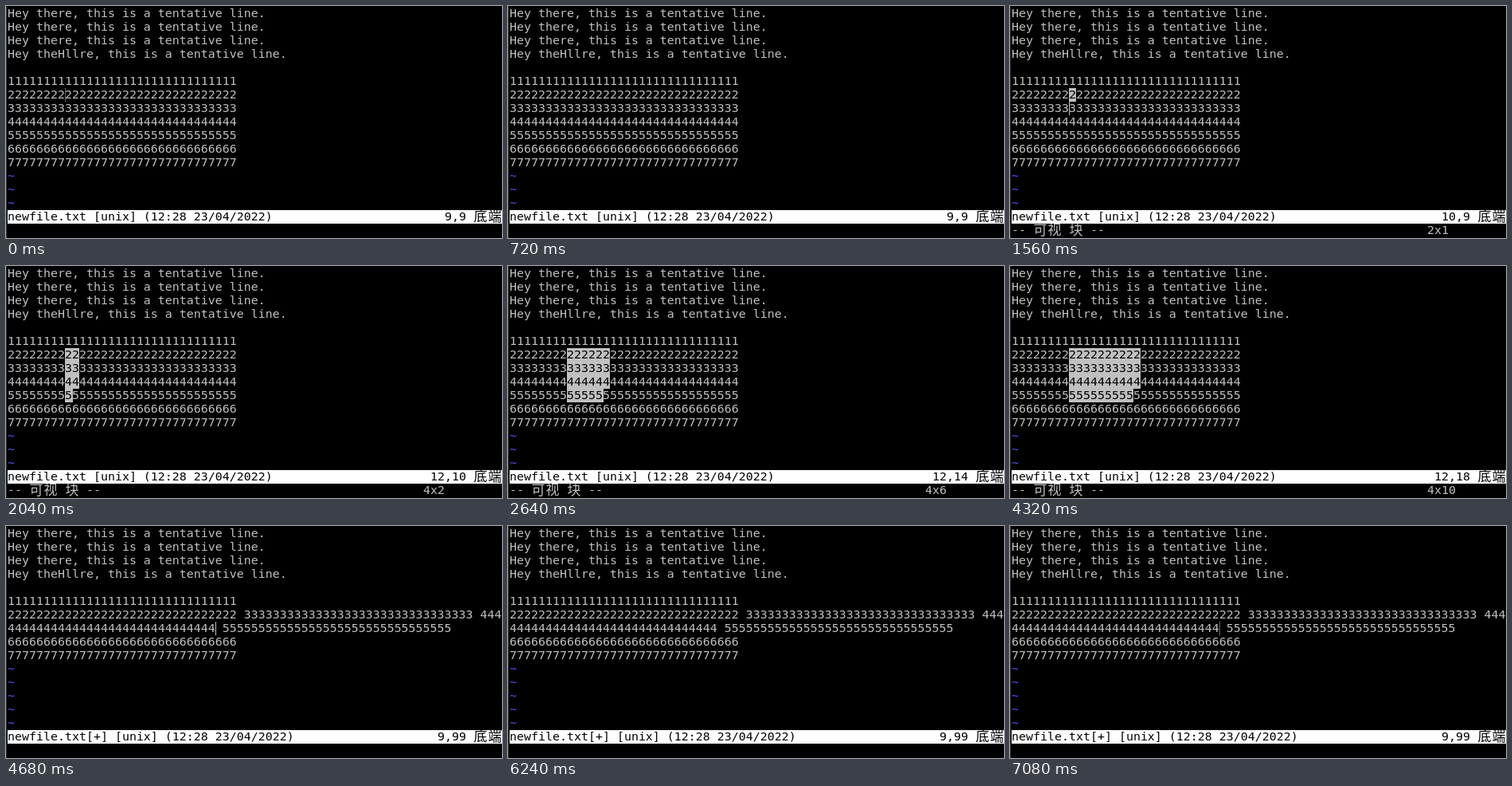
Recreate the animation shown at these times as an HTML page. Size 623x291 px, loop 7140 ms.

```html
<!DOCTYPE html>
<html lang="en">
<head>
<meta charset="utf-8">
<title>Joining lines from a block selection</title>
<style>
  html, body { margin: 0; width: 100%; height: 100%; overflow: hidden; background: #000; }
  svg { display: block; width: 623px; height: 291px; }
  text { font: 14.95px "DejaVu Sans Mono", "Liberation Mono", monospace; white-space: pre; }
  text.cjk { font: 17px "Noto Sans CJK SC", "Noto Sans CJK", sans-serif; }
</style>
</head>
<body>
<svg id="stage" viewBox="0 0 623 291"></svg>
<script>
const LOOP = 7140, CELL = 9, LINE = 17, LEFT = 2, TOP = 1;
const GRAY = '#c0c0c0', BLUE = '#5050f0';
const STATUS_ROW = 15, COMMAND_ROW = 16, ANCHOR = { row: 6, col: 8 };
const stage = document.getElementById('stage');

const digits = d => String(d).repeat(32);
const greeting = 'Hey there, this is a tentative line.';
const intro = [greeting, greeting, greeting, 'Hey theHllre, this is a tentative line.', ''];
const joined = [2, 3, 4, 5].map(digits).join(' ');
const fill = lines => [...lines, ...Array(STATUS_ROW - lines.length).fill('~')];
const before = fill([...intro, ...[1, 2, 3, 4, 5, 6, 7].map(digits)]);
const after = fill([...intro, digits(1), joined.slice(0, 69), joined.slice(69), digits(6), digits(7)]);

// Block selection corner: [start time, row, column]
const moves = [
  [1200, 6, 8], [1560, 7, 8], [1680, 8, 8], [1920, 9, 8], [2040, 9, 9],
  [2580, 9, 11], [2640, 9, 13], [2700, 9, 14], [2760, 9, 16], [2820, 9, 17]
];
const blinks = [720, 1200, 3300, 3840, 4320, 4680, 5220, 5700, 6240, 6720];

const px = col => LEFT + col * CELL;
const py = row => TOP + row * LINE;

function add(tag, attrs, content = '') {
  const node = document.createElementNS('http://www.w3.org/2000/svg', tag);
  for (const key in attrs) node.setAttribute(key, attrs[key]);
  node.textContent = content;
  stage.append(node);
}

const box = (x, y, width, height, fill) =>
  add('rect', { x, y, width, height, fill, 'shape-rendering': 'crispEdges' });

const print = (row, col, str, fill = GRAY) =>
  add('text', { x: px(col), y: py(row) + 13, fill }, str);

// Wide characters take two cells each.
function printWide(row, col, str, fill = GRAY) {
  [...str].forEach((ch, i) =>
    add('text', { class: 'cjk', x: px(col + i * 2) + 0.5, y: py(row) + 14, fill }, ch));
}

function drawSelection(lines, end) {
  for (let row = ANCHOR.row; row <= end.row; row++) {
    // The bar cursor leaves its own cell unlit.
    const stop = row === end.row ? end.col : end.col + 1;
    const width = stop - ANCHOR.col;
    if (width < 1) continue;
    box(px(ANCHOR.col), py(row), width * CELL, LINE, GRAY);
    print(row, ANCHOR.col, lines[row].slice(ANCHOR.col, stop), '#000');
  }
}

function drawCursor({ row, col }, focused, lit) {
  const x = px(col), y = py(row);
  if (!focused) {
    for (let i = 0; i < LINE; i += 2) box(x, y + i, 1, 1, GRAY);
  } else if (lit) {
    box(x, y, 1, LINE, GRAY);
  }
}

function drawStatus(isJoined, row, col) {
  box(LEFT, py(STATUS_ROW), 621, LINE, '#fff');
  print(STATUS_ROW, 0, `newfile.txt${isJoined ? '[+]' : ''} [unix] (12:28 23/04/2022)`, '#000');
  const ruler = `${row},${col}`;
  print(STATUS_ROW, 64 - ruler.length, ruler, '#000');
  printWide(STATUS_ROW, 65, '底端', '#000');
}

function drawMode(end) {
  print(COMMAND_ROW, 0, '--');
  printWide(COMMAND_ROW, 3, '可视');
  printWide(COMMAND_ROW, 8, '块');
  print(COMMAND_ROW, 11, '--');
  print(COMMAND_ROW, 58, `${end.row - ANCHOR.row + 1}x${end.col - ANCHOR.col + 1}`);
}

function stateAt(t) {
  const isJoined = t >= 4680;
  const visual = t >= 1200 && !isJoined;
  const move = moves.filter(m => m[0] <= t).pop();
  const cursor = isJoined ? { row: 7, col: 29 }
    : visual ? { row: move[1], col: move[2] } : ANCHOR;
  return {
    isJoined, visual, cursor,
    focused: t >= 180 && t < 7080,
    lit: blinks.filter(b => b <= t).length % 2 === 0
  };
}

let shown = '';
function draw(t) {
  const state = stateAt(t);
  const key = JSON.stringify(state);
  if (key === shown) return;
  shown = key;

  const { isJoined, visual, cursor, focused, lit } = state;
  const lines = isJoined ? after : before;
  stage.replaceChildren();
  box(0, 0, 623, 291, '#000');
  box(0, 0, 1, 291, focused ? '#303030' : '#404040');
  lines.forEach((line, row) => print(row, 0, line, line === '~' ? BLUE : GRAY));
  if (visual) drawSelection(lines, cursor);
  drawCursor(cursor, focused, lit);
  if (isJoined) drawStatus(true, 9, 99);
  else drawStatus(false, cursor.row + 3, cursor.col + 1);
  if (visual) drawMode(cursor);
}

const start = performance.now();
function tick() {
  draw((performance.now() - start) % LOOP);
  requestAnimationFrame(tick);
}
draw(0);
tick();
</script>
</body>
</html>
```
